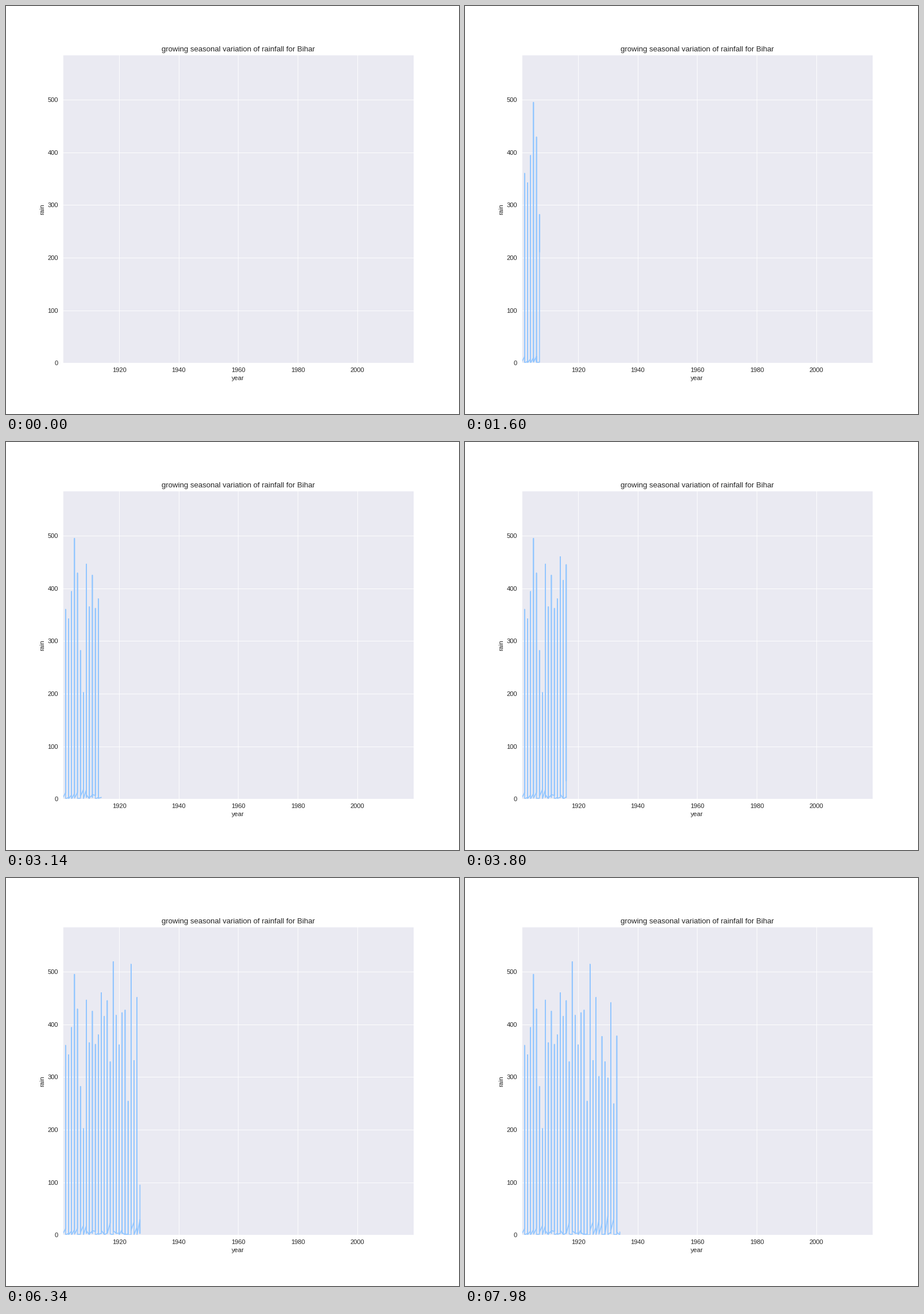
These frames come from a looping animation (789x710 px, 8 s). A matplotlib script:

```python
import numpy as np
import matplotlib.pyplot as plt
from matplotlib.animation import FuncAnimation

W, H, DPI = 789, 710, 80
FRAMES, STEP_MS = 400, 20
INK = "0.15"

plt.rcParams.update({
    "font.family": "Liberation Sans",
    "font.size": 10,
    "axes.titlesize": 11.9,
    "axes.edgecolor": "white",
    "axes.linewidth": 0.8,
    "text.color": INK,
    "axes.labelcolor": INK,
    "xtick.color": INK,
    "ytick.color": INK,
})

# Wettest month of each year from 1901
PEAK = [320, 360, 342, 394, 495, 429, 282, 202, 446, 365, 425, 362,
        380, 460, 415, 445, 329, 519, 417, 361, 422, 427, 254, 514,
        331, 451, 301, 377, 329, 298, 441, 249, 378, 300]

rng = np.random.default_rng(4)


def monthly(i, peak):
    """Rain of one year: an August monsoon bell with light, uneven winter rain."""
    month = np.arange(12)
    rain = 3 + (peak - 3) * np.exp(-(month - 7) ** 2 / 3.4)
    rain[0] = (12 + i) * rng.random() ** 3
    rain[11] = 10 * rng.random() ** 3
    return rain


rain = np.concatenate([monthly(i, p) for i, p in enumerate(PEAK)])
rain[:3] = np.nan  # the line starts in April
year = 1901 + np.arange(rain.size) // 12

fig = plt.figure(figsize=(W / DPI, H / DPI), dpi=DPI, facecolor="white")
ax = fig.add_axes([0.125, 0.125, 0.775, 0.755], facecolor="#EAEAF2")
ax.set(xlim=(1901, 2019), ylim=(0, 585), xlabel="year", ylabel="rain",
       title="growing seasonal variation of rainfall for Bihar",
       xticks=range(1920, 2001, 20), yticks=range(0, 501, 100))
ax.tick_params(length=0, pad=7)
ax.grid(color="white", lw=0.8)
ax.set_axisbelow(True)

line, = ax.plot([], [], color="#92C6FF", lw=1.5, solid_capstyle="round")


def draw(n):
    line.set_data(year[:n + 1], rain[:n + 1])
    return line,


anim = FuncAnimation(fig, draw, frames=FRAMES, interval=STEP_MS,
                     repeat=True, repeat_delay=0)
plt.show()
```
